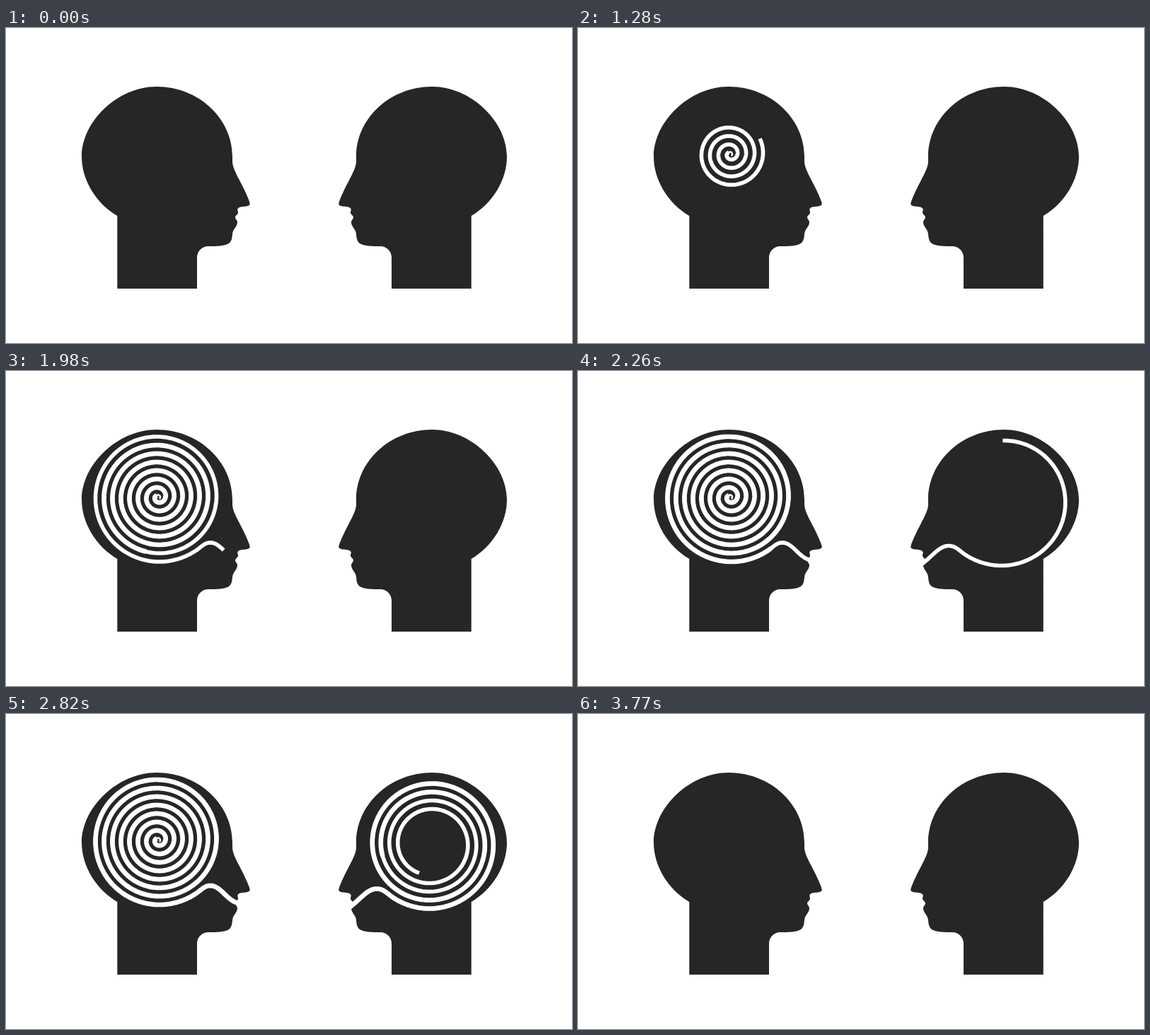
Recreate the animation shown at these times as an HTML page with a canvas. Size 800 px wide and 446 px high, loop 4100 ms.

```html
<!DOCTYPE html>
<html lang="en">
<head>
<meta charset="utf-8">
<title>Two heads, one thread</title>
<style>
  html, body { margin: 0; width: 100%; height: 100%; overflow: hidden; background: #fff; }
  canvas { display: block; width: 800px; height: 446px; }
</style>
</head>
<body>
<canvas id="stage" width="800" height="446"></canvas>
<script>
const ctx = document.getElementById('stage').getContext('2d');
const LOOP = 4100, BEGIN = 1000, CLEAR = 3770, STEP = 70, HALF = 16;
const THIN = 5.6, FULL = 6.7, LAG = 5, PITCH = 12;

const head = new Path2D(
  'M157.3 369V266C127 248 107 215 107 182C107 133 157 83 213 83' +
  'C272 83 320 128 320 182V189C320 196 325 206 329.5 214.5' +
  'C335 225 342.5 240 344.5 247.5C345.3 250.5 344 251.5 339 252.6' +
  'C335 253.2 330 252.6 327.5 256C326.5 258 328.6 260 328 262' +
  'C327 264.5 324.3 265.5 324 268C324 270.5 327 272 327 275' +
  'C327 281 321.5 284 320.3 290C319.3 296 320 301 315 305' +
  'C309 309 297 309 286 309C277 309 270 316 270 325V369Z');

const mix = (a, b, t) => a + (b - a) * t;

// Point on a Bezier curve, by repeated halving of its control polygon
function bezier(points, t) {
  while (points.length > 1) {
    points = points.slice(1).map((p, i) =>
      [mix(points[i][0], p[0], t), mix(points[i][1], p[1], t)]);
  }
  return points[0];
}

// Two cubic curves joined at the fourth key point; t runs 0..1
function tail(keys, t) {
  const p = 2 * Math.min(t, 1);
  return p < 1 ? bezier(keys.slice(0, 4), p) : bezier(keys.slice(3), p - 1);
}

const leftKeys = [[269.5, 253.5], [277.5, 247.7], [281.5, 243], [289, 243],
                  [304, 243], [313, 266], [330, 268]];
const rightKeys = [[486, 273.5], [502, 261], [511, 247.5], [524, 247.5],
                   [533, 247.5], [538, 253.3], [545.8, 259]];

// u counts turns along the thread
function leftPoint(u) {
  if (u > 7.6) return tail(leftKeys, (u - 7.6) / 0.2);
  const r = Math.max(1.5 + PITCH * u, 3), a = 2 * Math.PI * u;
  return [215 - r * Math.sin(a), 178.5 - r * Math.cos(a)];
}

function rightPoint(u) {
  if (u < -0.1) return tail(rightKeys, (u + 0.6) / 0.5);
  const r = 91.5 - PITCH * u, a = 2 * Math.PI * u;
  return [600.3 + r * Math.sin(a), 184 + r * Math.cos(a)];
}

// Left slows towards the mouth, right turns at an even pace
const leftEnd = k => {
  const p = Math.min(Math.max((k + 1) / HALF, 0), 1);
  return 7.8 * (1 - Math.pow(1 - p, 1.8));
};
const rightEnd = k => k < HALF ? -0.6 : 0.43 * (k - HALF) - 0.36;

function thread(point, from, to, width) {
  if (to <= from) return;
  ctx.beginPath();
  for (let u = from; u < to; u += 0.006) ctx.lineTo(...point(u));
  ctx.lineTo(...point(to));
  ctx.lineWidth = width;
  ctx.stroke();
}

function draw(ms) {
  const t = ms % LOOP;
  ctx.fillStyle = '#fff';
  ctx.fillRect(0, 0, 800, 446);
  ctx.fillStyle = '#272526';
  ctx.fill(head);
  ctx.setTransform(-1, 0, 0, 1, 815, 0);
  ctx.fill(head);
  ctx.setTransform(1, 0, 0, 1, 0, 0);
  if (t < BEGIN || t >= CLEAR) return;

  const k = Math.min(Math.floor((t - BEGIN) / STEP), 2 * HALF - 1);
  ctx.strokeStyle = '#fff';
  ctx.lineJoin = 'round';
  thread(leftPoint, -0.4, 0.13, 2.5);
  // Fresh thread is thin and fills out a few steps later
  for (const [step, width] of [[k, THIN], [k - LAG, FULL]]) {
    thread(leftPoint, 0.12, leftEnd(step), width);
    thread(rightPoint, -0.6, rightEnd(step), width);
  }
}

function tick() {
  draw(performance.now());
  requestAnimationFrame(tick);
}
tick();
</script>
</body>
</html>
```
